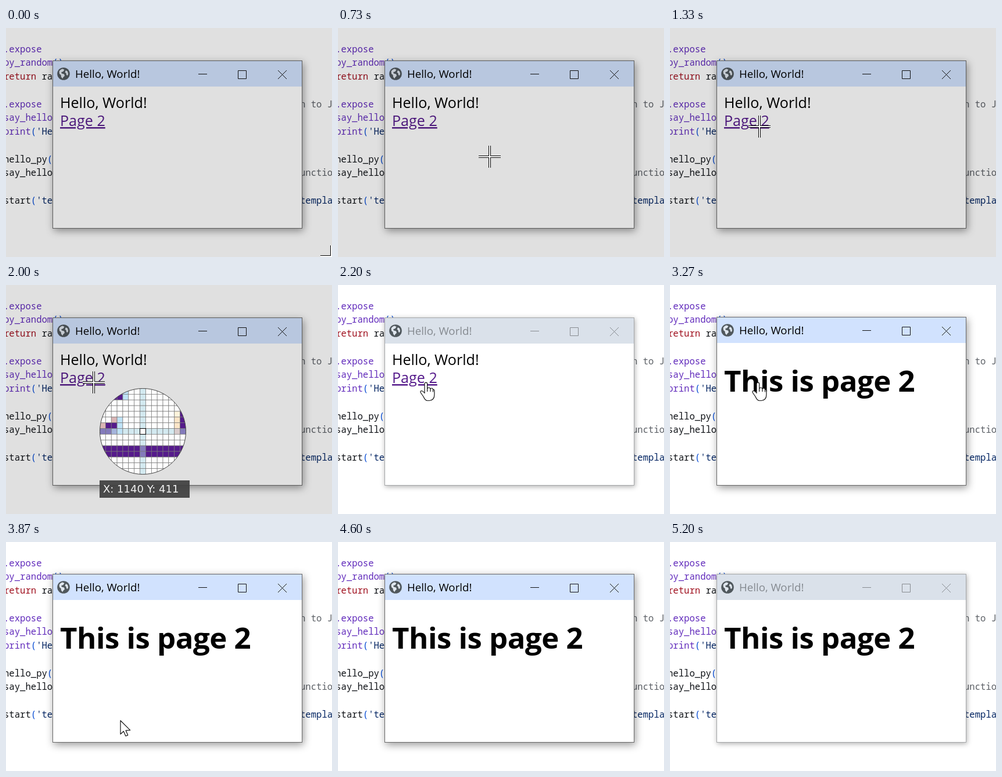
Animation of 561 by 395 pixels, one loop 5.47 s. Source, as an HTML page:

```html
<!DOCTYPE html>
<html lang="en">
<head>
<meta charset="utf-8">
<title>Hello, World!</title>
<style>
  html, body { margin: 0; width: 100%; height: 100%; overflow: hidden; background: #fff; }
  svg { display: block; width: 561px; height: 395px; font-family: "Open Sans", "Noto Sans", sans-serif; }
  text { white-space: pre; }
  .code { font: 15.6px "Noto Sans Mono", monospace; fill: #0e1116; }
  .fn { fill: #622cbc; }
  .kw { fill: #a0111f; }
  .str { fill: #032563; }
  .par { fill: #0349d4; }
  .note { fill: #5c6066; }
  #frame { fill: #fff; stroke: #666; filter: drop-shadow(2px 4px 7px rgba(0,0,0,.4)); }
  #bar { fill: #d1e2fe; }
  #caption { font-size: 18.7px; }
  #controls { fill: none; stroke: #111; }
  .idle #frame { stroke: #a4a6a8; filter: drop-shadow(1px 2px 4px rgba(0,0,0,.32)); }
  .idle #bar { fill: #dae1ea; }
  .idle #caption { fill: #858a90; }
  .idle #controls { stroke: #878b90; }
  #link { fill: #551a8b; text-decoration: underline; text-decoration-thickness: 2px; }
  .pressed #link { fill: #f00; }
  #home { font-size: 25.1px; }
  #page2 { font-size: 50.9px; font-weight: 700; letter-spacing: -.5px; }
  #hand, #arrow { fill: #fff; stroke: #111; stroke-width: 1.2; stroke-linejoin: round; }
  #tip { font: 18px "DejaVu Sans", sans-serif; fill: #f4f4f4; }
</style>
</head>
<body>
<svg id="stage" viewBox="0 0 561 395">
  <g class="code">
    <text x="-4" y="41.5" class="fn">.expose</text>
    <text x="-4" y="65" class="fn">py_random<tspan class="par">()</tspan></text>
    <text x="-4" y="89"><tspan class="kw">return</tspan> ran</text>
    <text x="-4" y="136.5" class="fn">.expose</text>
    <text x="-4" y="160" class="fn">say_hello</text>
    <text x="-4" y="184" class="fn">print<tspan class="par">(</tspan><tspan class="str">'He</tspan></text>
    <text x="-4" y="231.5">hello_py<tspan class="par">(</tspan></text>
    <text x="-4" y="255">say_hello</text>
    <text x="-4" y="302.5">start<tspan class="par">(</tspan><tspan class="str">'te</tspan></text>
    <text x="506" y="136.5" class="note">n to J</text>
    <text x="506" y="255" class="note">unctio</text>
    <text x="506" y="302.5" class="str">templa</text>
  </g>

  <rect id="frame" x="80.5" y="56.5" width="429" height="289"/>
  <g id="head">
    <rect id="bar" x="81" y="57" width="428" height="44"/>
    <circle cx="99" cy="79" r="10.8" fill="#50585d"/>
    <path fill="#dfe6ee" d="M91.500 75q2-4 6-4.500l3 1.500-2 3-3.500 1.500 1 2 4 1 1 3-3 3-.5 2-2.500-3-.5-3.500-2.500-2zM103 73l3 2 1 4-1 3-2-1-.5-3-2-1.500z"/>
    <text id="caption" x="119" y="86">Hello, World!</text>
    <path id="controls" d="M331 79.5h15M399.5 73.5h14v14h-14zM468 73l15 15M483 73l-15 15"/>
  </g>
  <g id="home">
    <text x="93" y="138">Hello, World!</text>
    <text id="link" x="93" y="169">Page 2</text>
  </g>
  <text id="page2" x="93" y="184">This is page 2</text>

  <rect id="dim" width="561" height="395" opacity=".12"/>

  <g id="lens">
    <clipPath id="round"><circle cx="235.5" cy="252.5" r="74"/></clipPath>
    <g id="cells" clip-path="url(#round)" stroke="#777" stroke-width=".7"></g>
    <circle cx="235.5" cy="252.5" r="74" fill="none" stroke="#444"/>
    <rect x="230.5" y="247.5" width="10" height="10" fill="#fff" stroke="#000"/>
    <rect x="161" y="337" width="155" height="30" fill="#404040" opacity=".93"/>
    <text id="tip" x="167" y="358">X: 1140 Y: 411</text>
  </g>

  <g id="cross">
    <path d="M-19 0h38M0-19v38" stroke="#000" stroke-width="4"/>
    <path d="M-19 0h38M0-19v38" stroke="#fff" stroke-width="2"/>
  </g>
  <g id="hand">
    <path d="M-2 17V2.5a2.300 2.300 0 0 1 4.600 0V11q.4-2 2.700-2t2.700 2.500q.3-1.500 2.300-1.500t2.200 2.500q2.400-.5 2.400 2V21q0 10-9 10.500H3q-4 0-7-7l-4.500-6.500q-1.500-3 1-3.500 2.500 0 5.500 4z"/>
    <path d="M2.600 11v5M8 11.500v4.500M12.500 12.500v4" fill="none"/>
  </g>
  <path id="arrow" d="M0 0v23.500l5.300-5 3.700 8.200 3.700-1.600-3.600-8 7.600-.5z"/>
</svg>
<script>
const LOOP = 5470, TICK = 1000 / 15;
const el = id => document.getElementById(id);
const show = (id, on) => el(id).style.display = on ? "" : "none";

// Magnified pixels: "row,column" -> colour
const ink = "#551a8b", mute = "#837bbb", sky = "#bfe3f7", rose = "#dab5b5", cream = "#fde6c8";
const pixels = {
  "0,2": rose, "0,3": ink, "0,4": sky, "1,2": ink, "1,3": ink, "1,4": sky,
  "5,2": rose, "5,3": sky, "6,0": rose, "6,1": ink, "6,2": ink, "6,3": sky,
  "7,0": mute, "7,1": mute, "7,2": "#a4b4dc", "7,3": sky,
  "4,13": "#fff4dc", "4,14": ink, "5,13": cream, "5,14": ink,
  "6,13": cream, "6,14": ink, "7,13": "#d9cccc", "7,14": mute
};
function cellColour(r, c) {
  if (r === 10 || r === 11) return c === 7 ? mute : ink;
  return pixels[[r, c]] || (r === 7 || c === 7 ? "#d3e9f0" : "#fff");
}
const SIZE = 148 / 15;
for (let i = 0; i < 225; i++) {
  const r = Math.floor(i / 15), c = i % 15;
  const cell = document.createElementNS(el("stage").namespaceURI, "rect");
  const box = { x: 161.5 + c * SIZE, y: 178.5 + r * SIZE, width: SIZE, height: SIZE, fill: cellColour(r, c) };
  for (const key in box) cell.setAttribute(key, box[key]);
  el("cells").append(cell);
}

function crossAt(n) {
  if (n >= 23) return [151, 168];
  if (n === 22) return [148, 168];
  const left = 1 - Math.min(Math.max((n - 2) / 18, 0), 1);
  return [154 + 406 * left ** 1.92, 170 + 224 * left ** 2.11].map(Math.round);
}

function arrowAt(n) {
  if (n < 50) return null;
  if (n < 58) return [147, 157];
  const steps = {
    58: [197, 308], 59: [214, 352], 60: [222, 372], 61: [224, 384],
    66: [82, 384], 67: [80, 377], 68: [79, 384]
  };
  return steps[n];
}

function place(id, pos) {
  show(id, pos);
  if (pos) el(id).setAttribute("transform", `translate(${pos})`);
}

function draw(now) {
  const n = Math.floor((now % LOOP + 4) / TICK);
  const picking = n < 33, second = n >= 48;
  const stage = el("stage");
  stage.classList.toggle("idle", n >= 33 && n < 45 || n >= 78);
  stage.classList.toggle("pressed", n >= 45);
  show("home", !second);
  show("page2", second);
  show("dim", picking);
  show("lens", n >= 30 && picking);
  el("head").setAttribute("transform", `translate(0 ${second ? -1 : 0})`);
  el("frame").setAttribute("y", second ? 55.5 : 56.5);
  el("frame").setAttribute("height", second ? 290 : 289);
  place("cross", picking && crossAt(n));
  place("hand", !picking && n < 50 && [151, 168]);
  place("arrow", arrowAt(n));
  requestAnimationFrame(() => draw(performance.now()));
}
draw(0);
</script>
</body>
</html>
```
